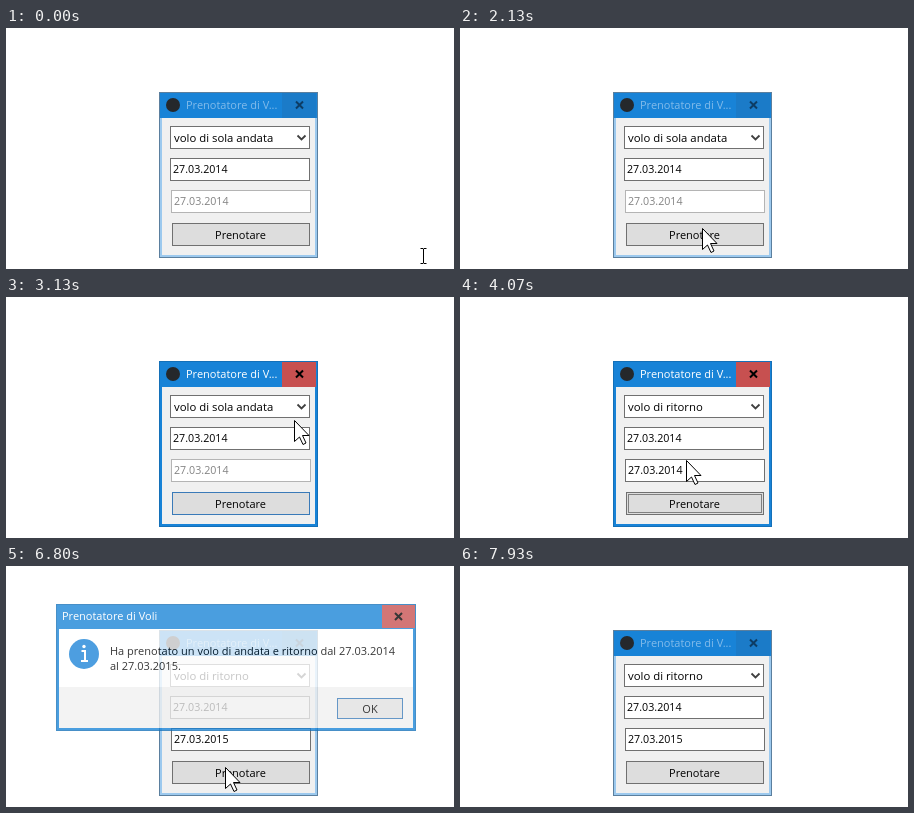
These frames come from a looping animation (448x241 px, 8140 ms). An HTML page:

```html
<!DOCTYPE html>
<html lang="it">
<head>
<meta charset="utf-8">
<title>Prenotatore di Voli</title>
<style>
  html, body { margin: 0; width: 100%; height: 100%; overflow: hidden; background: #fff; }
  svg { display: block; width: 448px; height: 241px; }
  text { font: 11px "Open Sans", "Noto Sans", sans-serif; white-space: pre; }
  .date { font-size: 10.7px; }
  .combo { font-size: 11.35px; }
  .box { fill: #fff; stroke: #707070; }
</style>
</head>
<body>
<svg viewBox="0 0 448 241">
  <g id="win">
    <rect id="frame" x="153.5" y="64.5" width="158" height="165"/>
    <rect x="154" y="65" width="157" height="25" fill="#1883d7"/>
    <rect x="156" y="90" width="153" height="137" fill="#f0f0f0"/>
    <circle cx="167" cy="77" r="7" fill="#25282c"/>
    <text id="title" x="180" y="81">Prenotatore di V...</text>
    <rect id="close" x="276" y="65" width="34" height="25"/>
    <path id="closeX" d="M290 73.5l7 7m0-7l-7 7" stroke-width="2"/>
    <rect class="box" x="164.5" y="98.5" width="139" height="22"/>
    <text class="combo" id="trip" x="168" y="114"></text>
    <path d="M291.5 107.5l4 4 4-4" fill="none" stroke="#404040" stroke-width="1.8"/>
    <rect class="box" x="164.5" y="130.5" width="139" height="22"/>
    <text class="date" x="167" y="145">27.03.2014</text>
    <rect id="back" x="165.5" y="162.5" width="139" height="22" fill="#fff"/>
    <text class="date" id="backDate" x="168" y="177"></text>
    <path id="caret" d="M0 165.5v15" stroke="#000"/>
    <g id="book">
      <rect id="bookBox" x="166.5" y="195.5" width="137" height="22"/>
      <rect id="ring" x="168.5" y="197.5" width="133" height="18" fill="none" stroke="#222" stroke-dasharray="1 1"/>
      <text x="234.5" y="210.5" text-anchor="middle">Prenotare</text>
    </g>
  </g>
  <g id="dlg">
    <rect id="dlgFrame" x="50.5" width="359" fill="#1883d7" stroke="#1470b8"/>
    <g id="dlgTop">
      <text x="56" y="16" fill="#fff">Prenotatore di Voli</text>
      <rect x="376" y="1" width="33" height="23" fill="#c75050"/>
      <path d="M389 9l7 7m0-7l-7 7" stroke="#000" stroke-width="2"/>
    </g>
    <rect id="dlgBody" x="53" width="354" fill="#fff"/>
    <rect id="dlgFoot" x="53" width="354" height="41" fill="#f0f0f0"/>
    <g id="info">
      <circle cx="78" cy="0" r="15" fill="#1c84d8"/>
      <path d="M75.5-3h3.5v10m-4 0h7" fill="none" stroke="#fff" stroke-width="2"/>
      <circle cx="78" cy="-7.5" r="1.7" fill="#fff"/>
      <text id="line1" x="104"></text>
      <text id="line2" x="104" y="16">al 27.03.2015.</text>
    </g>
    <g id="ok">
      <rect id="okBox" x="331.5" y=".5" width="65" height="20" stroke="#3a7ab8"/>
      <text x="364" y="15" text-anchor="middle">OK</text>
    </g>
  </g>
  <path id="arrow" d="M.5.5v21l5-4.5 3.5 7.5 3-1.5-3.5-7.5h6.5z" fill="#fff" stroke="#000"/>
  <path id="beam" d="M-3-7.5h2.5l.5.5.5-.5h2.5M0-7v14M-3 7.5h2.5l.5-.5.5.5h2.5" fill="none" stroke="#000"/>
</svg>
<script>
const LOOP = 8140;
const $ = id => document.getElementById(id);
const set = (id, attrs) => { for (const k in attrs) $(id).setAttribute(k, attrs[k]); };
const show = (id, on) => set(id, { visibility: on ? "visible" : "hidden" });
const ramp = (t, from, to) => Math.min(1, Math.max(0, (t - from) / (to - from)));
const within = (t, from, to) => t >= from && t < to;

// Pointer route: time, x, y
const route = [
  [0, 417.5, 228], [70, 417.5, 228], [800, 285, 139], [1070, 285, 139],
  [1800, 242, 200], [2200, 242, 200], [2730, 340, 136], [2870, 340, 136],
  [3130, 288, 123], [3330, 293, 107], [3670, 293, 107], [4070, 226, 163],
  [4300, 221, 172], [6270, 221, 172], [6500, 219, 201], [6800, 219, 201],
  [7070, 298, 151], [7330, 340, 143], [7500, 340, 143], [7900, 340, 265]
];

function pointer(t) {
  const i = route.findIndex(p => p[0] > t);
  if (i < 0) return route[route.length - 1].slice(1);
  const a = route[i - 1], b = route[i];
  const u = ramp(t, a[0], b[0]), e = u * u * (3 - 2 * u);
  return [a[1] + (b[1] - a[1]) * e, a[2] + (b[2] - a[2]) * e];
}

function drawWindow(t, x, y) {
  const active = within(t, 660, 2000) || within(t, 2930, 6600) || within(t, 7540, 7900);
  const roundTrip = t >= 3470;
  const typing = within(t, 4400, 6530);
  const hover = active && within(x, 166, 304) && within(y, 195, 218);
  const pressed = within(t, 1930, 2000) || within(t, 6530, 6600);

  set("frame", { fill: active ? "#1883d7" : "#9cc9ee", stroke: active ? "#1470b8" : "#5b7f9e" });
  set("title", { fill: active ? "#fff" : "#82bbea" });
  set("close", { fill: active ? "#c75050" : "#1b7bc8" });
  set("closeX", { stroke: active ? "#000" : "#0d3c64" });

  $("trip").textContent = roundTrip ? "volo di ritorno" : "volo di sola andata";
  set("back", { stroke: typing ? "#2a70b0" : roundTrip ? "#707070" : "#b4b4b4" });
  set("backDate", { fill: roundTrip ? "#000" : "#838383" });
  const partial = within(t, 4870, 6130);
  $("backDate").textContent = "27.03.201" + (partial ? "" : t < 6130 ? "4" : "5");
  show("caret", typing);
  set("caret", { transform: `translate(${partial ? 216.5 : 222.5})` });

  set("book", { opacity: partial ? 1 - 0.6 * ramp(t, 4870, 5600) : 1 });
  set("bookBox", {
    fill: pressed ? "#cce4f7" : hover ? "#e5f1fb" : "#ddd",
    stroke: active && (hover || within(t, 2930, 3470)) ? "#3a7ab8" : "#707070"
  });
  show("ring", within(t, 3470, 4400));
}

function drawDialog(t, x, y) {
  const second = t > 5000;
  const top = second ? 38 : 42, height = second ? 127 : 119;
  const alpha = second
    ? ramp(t, 6640, 6845) - ramp(t, 7470, 7680)
    : ramp(t, 2150, 2355) - ramp(t, 2870, 3080);
  const bottom = top + height;

  set("dlg", { opacity: alpha });
  set("dlgFrame", { y: top + .5, height: height - 1 });
  set("dlgTop", { transform: `translate(0 ${top})` });
  set("dlgBody", { y: top + 25, height: height - 28 });
  set("dlgFoot", { y: bottom - 44 });
  set("info", { transform: `translate(0 ${second ? 88 : 89})` });
  set("line1", { y: second ? 1 : 4 });
  $("line1").textContent = second
    ? "Ha prenotato un volo di andata e ritorno dal 27.03.2014"
    : "Ha prenotato un volo di sola andata per il 27.03.2014.";
  show("line2", second);
  set("ok", { transform: `translate(0 ${bottom - 33})` });
  const hover = within(x, 331, 397) && within(y, bottom - 33, bottom - 12);
  set("okBox", { fill: hover ? "#e5f1fb" : "#e1e1e1" });
  return alpha > 0 && within(x, 50, 410) && within(y, top, bottom);
}

function drawPointer(t, x, y, onDialog) {
  const onWindow = within(x, 153, 312) && within(y, 64, 230);
  const onField = within(x, 165, 304) &&
    (within(y, 131, 153) || t >= 3470 && within(y, 164, 185));
  const text = !onDialog && (!onWindow || onField);
  const visible = !within(t, 4600, 6270);
  show("arrow", visible && !text);
  show("beam", visible && text);
  set(text ? "beam" : "arrow", { transform: `translate(${x} ${y})` });
}

function frame(now) {
  const t = now % LOOP;
  const [x, y] = pointer(t);
  drawWindow(t, x, y);
  drawPointer(t, x, y, drawDialog(t, x, y));
}

let start;
function tick(now) {
  start ??= now;
  frame(now - start);
  requestAnimationFrame(tick);
}
frame(0);
requestAnimationFrame(tick);
</script>
</body>
</html>
```
